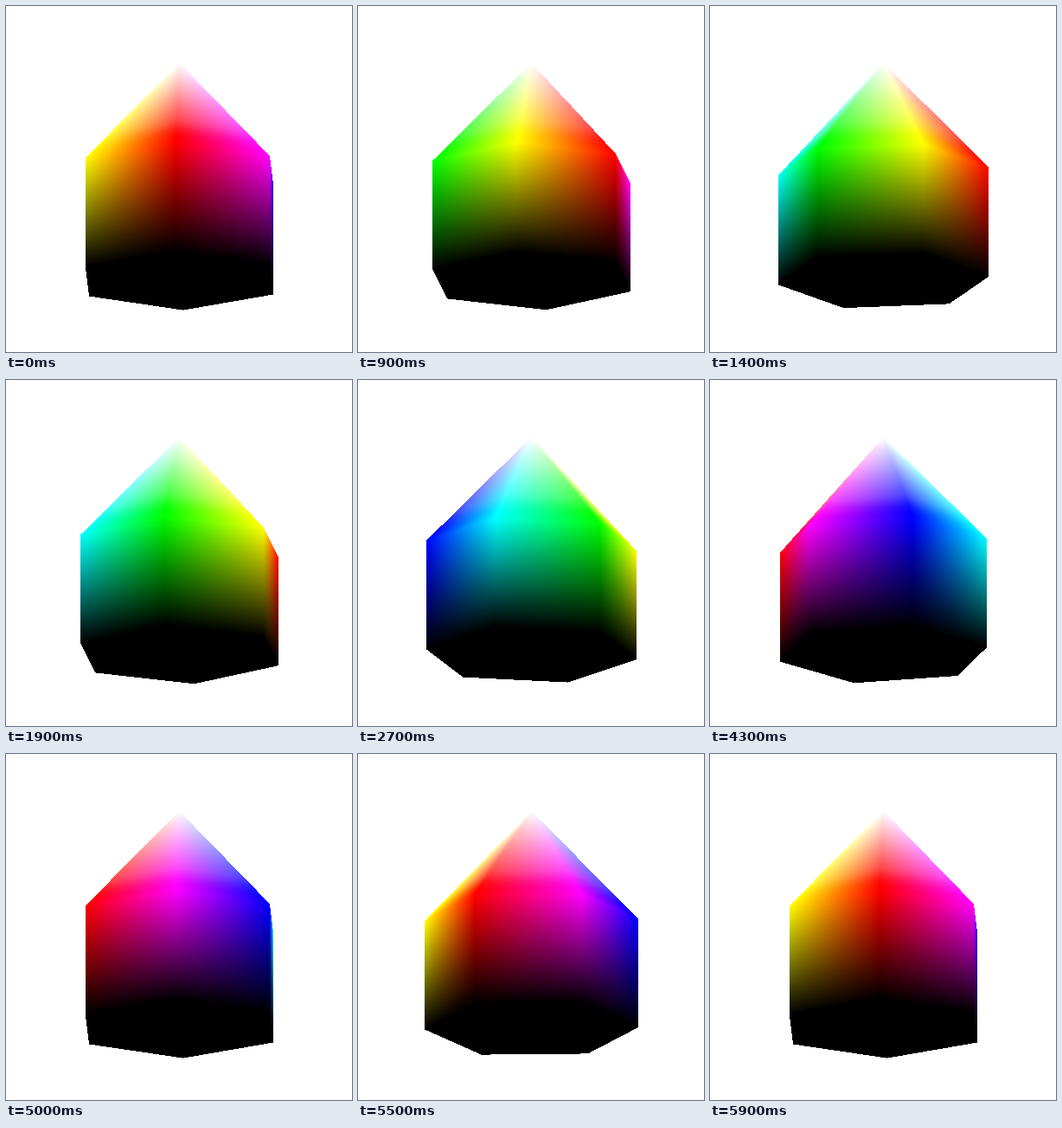
Write an HTML page with a canvas that moves like this. It is 400x400 px and loops after 6 s.

```html
<!DOCTYPE html>
<html lang="en">
<head>
<meta charset="utf-8">
<title>HSV solid</title>
<style>
  html, body { margin: 0; height: 100%; overflow: hidden; background: #fff; }
  canvas { display: block; }
</style>
</head>
<body>
<canvas id="stage" width="400" height="400"></canvas>
<script>
const SIZE = 400, STEP_MS = 100, STEPS = 60;
const CX = 200.5, RX = 123.15, RY = 34.15;        // projected hexagon
const RIM_Y = 191.45, HEIGHT = 126, EPS = 1e-6;
const APEX = [CX, 66], BASE = [CX, RIM_Y + HEIGHT];

const ctx = document.getElementById('stage').getContext('2d');
const image = ctx.createImageData(SIZE, SIZE);

// Pure hues in 60 degree steps: red, yellow, green, cyan, blue, magenta
const hues = [0, 1, 2, 3, 4, 5].map(i => [0, 2, 4].map(c => {
  const d = Math.abs(i - c);
  return Math.min(d, 6 - d) <= 1 ? 1 : 0;
}));

const add = (p, q) => [p[0] + q[0], p[1] + q[1]];
const sub = (p, q) => [p[0] - q[0], p[1] - q[1]];
const cross = (u, v) => u[0] * v[1] - u[1] * v[0];
const drop = p => add(p, [0, HEIGHT]);

// Paints the points origin + s*u + t*v that lie inside, if the face looks at us
function paint(origin, u, v, inside, shade) {
  const det = cross(u, v);
  if (det >= -EPS) return;
  const corners = [origin, add(origin, u), add(origin, v), add(add(origin, u), v)];
  const range = k => {
    const values = corners.map(p => p[k]);
    return [Math.max(0, Math.floor(Math.min(...values))), Math.min(SIZE, Math.ceil(Math.max(...values)))];
  };
  const [x0, x1] = range(0), [y0, y1] = range(1);
  for (let y = y0; y < y1; y++) {
    for (let x = x0; x < x1; x++) {
      const p = sub([x + 0.5, y + 0.5], origin);
      const s = cross(p, v) / det, t = cross(u, p) / det;
      if (!inside(s, t)) continue;
      const at = (y * SIZE + x) * 4;
      for (let c = 0; c < 3; c++) image.data[at + c] = 255 * shade(s, t, c);
    }
  }
}

const inTriangle = (s, t) => s >= -EPS && t >= -EPS && s + t <= 1 + EPS;
const inSquare = (s, t) => Math.min(s, t) >= -EPS && Math.max(s, t) <= 1 + EPS;

// White fades in gently above the rim, then grows linearly to the apex
function whiteness(w) {
  const k = Math.max(0, Math.min(1, w / 0.3));
  return w * k * k * (3 - 2 * k);
}

function roof(a, b, ca, cb) {
  paint(APEX, sub(b, APEX), sub(a, APEX), inTriangle, (s, t, c) => {
    const sum = s + t || 1, hue = (cb[c] * s + ca[c] * t) / sum;
    return hue + (1 - hue) * whiteness(1 - s - t);
  });
}

function wall(a, b, ca, cb) {
  paint(a, sub(b, a), [0, HEIGHT], inSquare,
    (s, t, c) => (ca[c] * (1 - s) + cb[c] * s) * (1 - t));
}

function floor(a, b) {
  paint(BASE, sub(a, BASE), sub(b, BASE), inTriangle, () => 0);
}

function draw(degrees) {
  image.data.fill(255);
  const rim = hues.map((_, i) => {
    const angle = (degrees - 60 * i) * Math.PI / 180;
    return [CX + RX * Math.sin(angle), RIM_Y - RY * Math.cos(angle)];
  });
  rim.forEach((a, i) => {
    const j = (i + 1) % 6, b = rim[j];
    floor(drop(a), drop(b));
    wall(a, b, hues[i], hues[j]);
    roof(a, b, hues[i], hues[j]);
  });
  ctx.putImageData(image, 0, 0);
}

let shown = -1;
function tick() {
  const step = Math.floor(performance.now() / STEP_MS) % STEPS;
  if (step !== shown) {
    shown = step;
    draw(-2 + 6 * (step % (STEPS - 1)));  // the last step repeats the first pose
  }
  requestAnimationFrame(tick);
}
tick();
</script>
</body>
</html>
```
